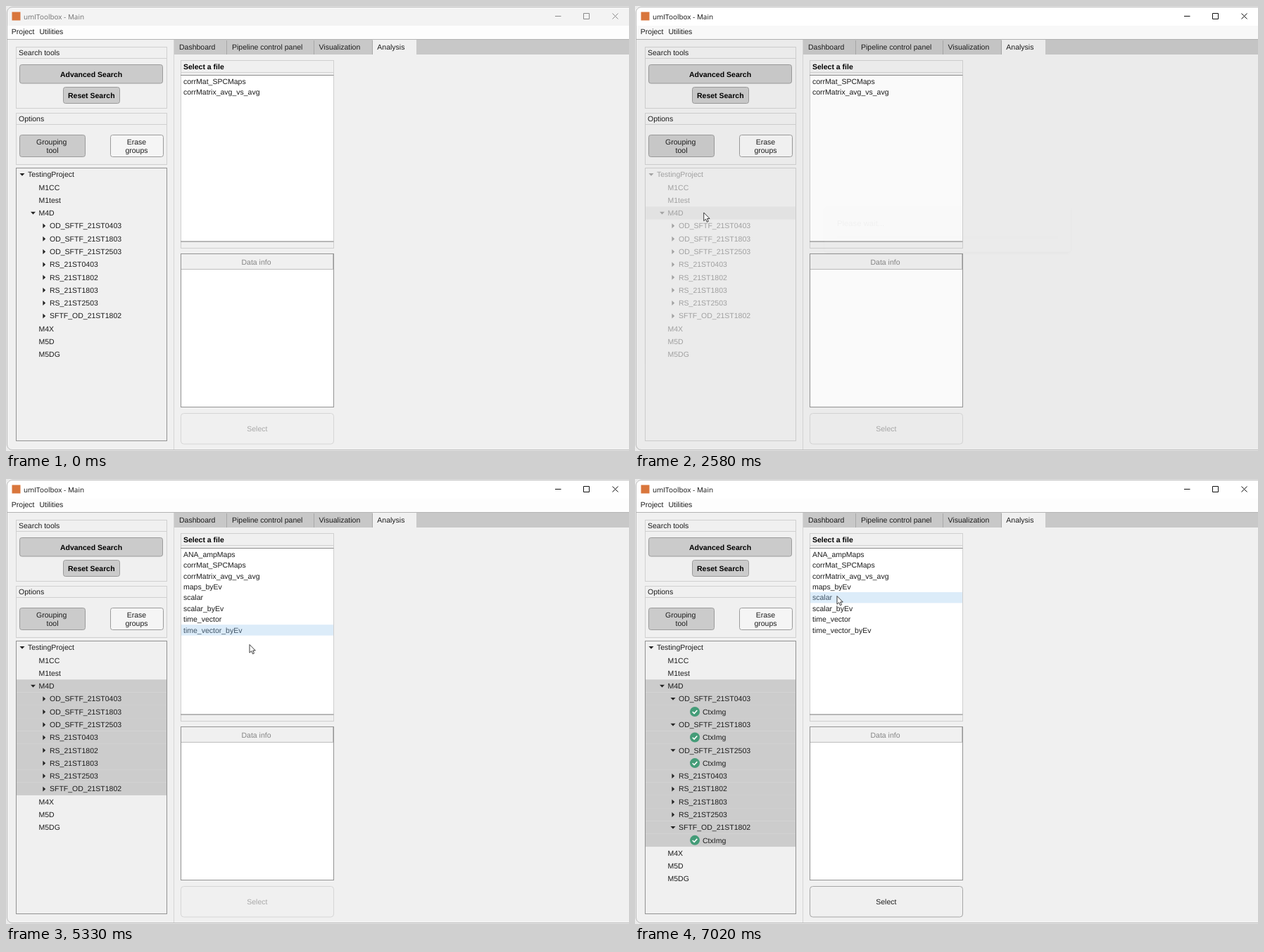
Animation, 885 px wide and 633 px high, one loop 8000 ms. Source, as an HTML page:

```html
<!DOCTYPE html>
<html lang="en">
<head>
<meta charset="utf-8">
<title>umIToolbox - Main</title>
<style>
  html, body { margin: 0; width: 100%; height: 100%; overflow: hidden; background: #ececec; }
  svg { display: block; width: 885px; height: 633px; }
  text { font: 10.5px "Liberation Sans", Arial, sans-serif; fill: #1c1c1c; text-rendering: geometricPrecision; white-space: pre; }
  .bold { font-weight: bold; fill: #000; }
  .mid { text-anchor: middle; }
  .title { font: 9.95px "Open Sans", sans-serif; }
  .wait { font-size: 11.3px; fill: #555; }
</style>
</head>
<body>
<svg viewBox="0 0 885 633" xmlns="http://www.w3.org/2000/svg">
  <defs>
    <clipPath id="frame"><rect x="1" y="1" width="900" height="631" rx="8"/></clipPath>
    <filter id="shadow" x="-10%" y="-30%" width="120%" height="170%">
      <feDropShadow dx="0" dy="2" stdDeviation="2.2" flood-color="#000" flood-opacity=".55"/>
    </filter>
  </defs>
  <g clip-path="url(#frame)">
    <g id="title"></g>
    <g id="base"></g>
    <g id="tree"></g>
    <g id="files"></g>
    <g id="select"></g>
    <rect id="dim" x="1" y="28" width="884" height="604"/>
  </g>
  <rect x="1.5" y="1.5" width="900" height="630" rx="7.5" fill="none" stroke="#b9b9b9"/>
  <g id="dialog">
    <rect x="269.5" y="284.5" width="349" height="65" rx="4" fill="#f0f0f0" filter="url(#shadow)"/>
    <text class="wait" x="287" y="313">Please wait...</text>
    <rect x="287" y="327" width="314" height="4.5" fill="#e0e0e0"/>
    <rect id="bar" y="327" height="4.5" fill="#268cdd"/>
  </g>
  <path id="cursor" d="M.5 .5V12.2L3.2 9.7L5 13.8L7 12.9L5.2 9H8.8Z" fill="#fff" stroke="#222" stroke-width=".9" stroke-linejoin="round"/>
</svg>
<script>
const LOOP = 8000, ROW = 18.29, TREE_TOP = 230.35, ITEM = 15.4, LIST_TOP = 99.4;
const el = id => document.getElementById(id);
const clamp = v => Math.max(0, Math.min(1, v));

// y is the middle of the line of text
const text = (s, x, y, cls = '', fill = '') =>
  `<text x="${x}" y="${y + 3.75}" class="${cls}"${fill && ` style="fill:${fill}"`}>${s}</text>`;
const box = (x, y, w, h, fill, stroke = 'none', rx = 0) =>
  `<rect x="${x}" y="${y}" width="${w}" height="${h}" rx="${rx}" fill="${fill}" stroke="${stroke}"/>`;
const line = (d, stroke) => `<path d="${d}" fill="none" stroke="${stroke}"/>`;

function drawBase() {
  const grey = '#cbcbcb', edge = '#9b9b9b', soft = '#d0d0d0';
  const tabs = [['Dashboard', 246], ['Pipeline control panel', 321], ['Visualization', 444.5]];
  el('base').innerHTML =
    box(1, 28, 884, 19, '#fdfdfd') + box(1, 47, 884, 586, '#f0f0f0') + line('M1 47.5H885', '#b4b4b4') +
    text('Project', 7.8, 36) + text('Utilities', 47.5, 36) +
    box(14.5, 58.5, 214, 87, 'none', soft) + line('M15 74.5H228', soft) + text('Search tools', 18, 66) +
    box(19.5, 83.5, 203, 26.5, grey, edge, 3) + text('Advanced Search', 121, 97, 'bold mid') +
    box(81.5, 115.5, 80, 23, grey, edge, 3) + text('Reset Search', 121.3, 127.3, 'bold mid') +
    box(14.5, 152.5, 214, 73, 'none', soft) + line('M15 168.5H228', soft) + text('Options', 18, 160.3) +
    box(19.5, 183.5, 93, 31, grey, edge, 3) +
    text('Grouping', 64.7, 193, 'mid') + text('tool', 66, 205, 'mid') +
    box(148.5, 183.5, 75, 31, '#f5f5f5', edge, 3) +
    text('Erase', 185.5, 193, 'mid') + text('groups', 185.5, 205, 'mid') +
    line('M238.5 48V632', '#d6d6d6') +
    box(239, 48, 646, 21, '#c8c8c8') + box(521, 48, 62, 21, '#f0f0f0') +
    line('M313.5 49V69M437.5 49V69M520.5 49V69', '#a8a8a8') +
    tabs.map(([s, x]) => text(s, x, 58.7)).join('') + text('Analysis', 527.3, 58.7) +
    box(248.5, 77.5, 217, 267, 'none', soft) + line('M249 94.5H465', soft) +
    text('Select a file', 252, 86.5, 'bold') +
    box(248.5, 98.5, 217, 236.5, '#fff', '#cfcfcf') + line('M248 98.5H465.5M248 335H465.5', '#8c8c8c') +
    box(248.5, 352.5, 217, 218, '#fff', '#949494') + box(249, 353, 216, 21, '#f0f0f0') +
    line('M249 374.5H465M464.5 353V374', '#bdbdbd') + text('Data info', 355.5, 364, 'mid', '#858585');
}

function drawTitle(active) {
  const ink = active ? '#111' : '#8a8a8a';
  el('title').innerHTML = box(1, 1, 884, 27, active ? '#fff' : '#f3f3f3') +
    box(8.5, 8.5, 12, 12, '#d9763c') +
    text('umIToolbox - Main', 25, 15, 'title', active ? '#111' : '#707070') +
    line('M780 14.5H788.5M820.5 10.5H828.5V18.5H820.5ZM861.5 10.5L869.5 18.5M869.5 10.5L861.5 18.5', ink);
}

const sessions = ['OD_SFTF_21ST0403', 'OD_SFTF_21ST1803', 'OD_SFTF_21ST2503', 'RS_21ST0403',
  'RS_21ST1802', 'RS_21ST1803', 'RS_21ST2503', 'SFTF_OD_21ST1802'];

// rows: name, depth, arrow (1 open, 0 closed, absent for none), inside the picked group
function treeRows(expanded) {
  const rows = [['TestingProject', 0, 1], ['M1CC', 1], ['M1test', 1], ['M4D', 1, 1, true]];
  for (const s of sessions) {
    const open = expanded && s.includes('OD');
    rows.push([s, 2, open ? 1 : 0, true]);
    if (open) rows.push(['CtxImg', 3, undefined, true]);
  }
  return rows.concat([['M4X', 1], ['M5D', 1], ['M5DG', 1]]);
}

function drawTree(expanded, picked, icons, hover) {
  let out = '';
  treeRows(expanded).forEach(([name, depth, arrow, inside], i) => {
    const y = TREE_TOP + ROW * (i + .5), x = [31, 46.5, 62, 96][depth], ax = x - 8;
    if (i === hover || picked && inside)
      out += box(15, y - ROW / 2, 213, ROW + .1, i === hover ? '#d9d9d9' : '#cccccc');
    if (arrow === 1) out += `<path d="M${ax - 3.5} ${y - 1.6}h7l-3.5 3.8z" fill="#222"/>`;
    if (arrow === 0) out += `<path d="M${ax - 1.6} ${y - 3.3}v7l3.8 -3.5z" fill="#222"/>`;
    if (depth === 3 && icons)
      out += `<circle cx="85" cy="${y}" r="7" fill="#449c78"/>` +
        `<path d="M81.7 ${y + .2}l2.4 2.4l4.2 -4.6" fill="none" stroke="#fff" stroke-width="1.6"/>`;
    out += text(name, x, y);
  });
  el('tree').innerHTML = out + box(14.5, 230.5, 214, 388, 'none', '#929292');
}

const fewFiles = ['corrMat_SPCMaps', 'corrMatrix_avg_vs_avg'];
const allFiles = ['ANA_ampMaps', ...fewFiles, 'maps_byEv', 'scalar', 'scalar_byEv', 'time_vector', 'time_vector_byEv'];

function drawFiles(names, hover) {
  el('files').innerHTML = names.map((s, i) => {
    const y = LIST_TOP + ITEM * (i + .5), on = i === hover;
    return (on ? box(249, y - ITEM / 2, 216, ITEM, '#dcecf9') : '') + text(s, 252, y, '', on ? '#3f5365' : '');
  }).join('');
}

function drawSelect(ready) {
  el('select').innerHTML = box(248.5, 579.5, 217, 43.5, '#f0f0f0', ready ? '#a6a6a6' : '#d6d6d6', 4) +
    text('Select', 356.8, 601.5, 'mid', ready ? '#1c1c1c' : '#a8a8a8');
}

const ticks = [0];
for (const [a, b, n] of [[930, 1680, 12], [1770, 2310, 9], [2580, 3330, 12], [3390, 3720, 6],
  [4590, 5330, 11], [5400, 5940, 9], [6210, 6270, 2], [6530, 6870, 6]])
  for (let i = 0; i < n; i++) ticks.push(a + (b - a) * i / (n - 1));
ticks.push(7020);

// pointer way: time, x, y
const way = [[930, 697, 621], [1070, 640, 590], [1250, 480, 530], [1400, 320, 480], [1540, 190, 448],
  [1610, 158, 439], [1680, 138, 429], [1770, 125, 403], [1900, 116, 368], [2060, 105, 322],
  [2180, 99, 301], [2310, 97, 293.5], [4590, 99, 293], [4660, 115, 292], [4725, 165, 289],
  [4800, 245, 240], [4870, 290, 165], [4940, 312, 112], [5000, 322, 104], [5080, 333, 140],
  [5200, 343, 205], [5330, 345.5, 235], [5400, 344, 231], [5600, 325, 203], [5800, 297, 174],
  [5940, 289, 163], [6210, 288, 164.5], [6270, 286.5, 166]];

function pointer(t) {
  if (t < way[0][0]) return [-50, -50];
  const i = way.findIndex(p => p[0] > t);
  if (i < 0) return way[way.length - 1].slice(1);
  const [a, b] = [way[i - 1], way[i]], k = (t - a[0]) / (b[0] - a[0]);
  return [a[1] + (b[1] - a[1]) * k, a[2] + (b[2] - a[2]) * k];
}

function dimming(t) {
  const pulse = (in0, in1, out0, out1) => Math.min(clamp((t - in0) / (in1 - in0)), clamp((out1 - t) / (out1 - out0)));
  return Math.max(pulse(2570, 2775, 3390, 3660), pulse(6480, 6640, 6660, 6860));
}

function render(step) {
  const t = ticks[step], [x, y] = pointer(t);
  // hover follows one refresh behind the pointer
  const [hx, hy] = pointer(ticks[Math.max(0, step - 1)]);
  const treeHover = hx > 15 && hx < 228 ? Math.floor((hy - TREE_TOP) / ROW) : -1;
  const fileHover = hx > 248 && hx < 465 ? Math.floor((hy - LIST_TOP) / ITEM) : -1;
  const dim = dimming(t);
  drawTitle(t >= 2580);
  drawTree(t >= 6800, t >= 3580, t >= 7020, treeHover);
  drawFiles(t >= 3390 ? allFiles : fewFiles, fileHover);
  drawSelect(t >= 7020);
  el('tree').setAttribute('opacity', dim > 0 ? .36 : 1);
  el('dim').setAttribute('opacity', .43 * dim);
  el('dialog').setAttribute('opacity', dim);
  const at = 314 * clamp((t - 2790) / 800), from = Math.max(0, at - 90);
  el('bar').setAttribute('x', 287 + from);
  el('bar').setAttribute('width', t < 4000 ? at - from : 0);
  el('cursor').setAttribute('transform', `translate(${x} ${y})`);
}

drawBase();
let shown = -1;
const start = performance.now();
function tick(now) {
  const t = Math.max(0, now - start) % LOOP;
  let step = ticks.length - 1;
  while (ticks[step] > t + .5) step--;
  if (step !== shown) render(shown = step);
  requestAnimationFrame(tick);
}
tick(start);
</script>
</body>
</html>
```
